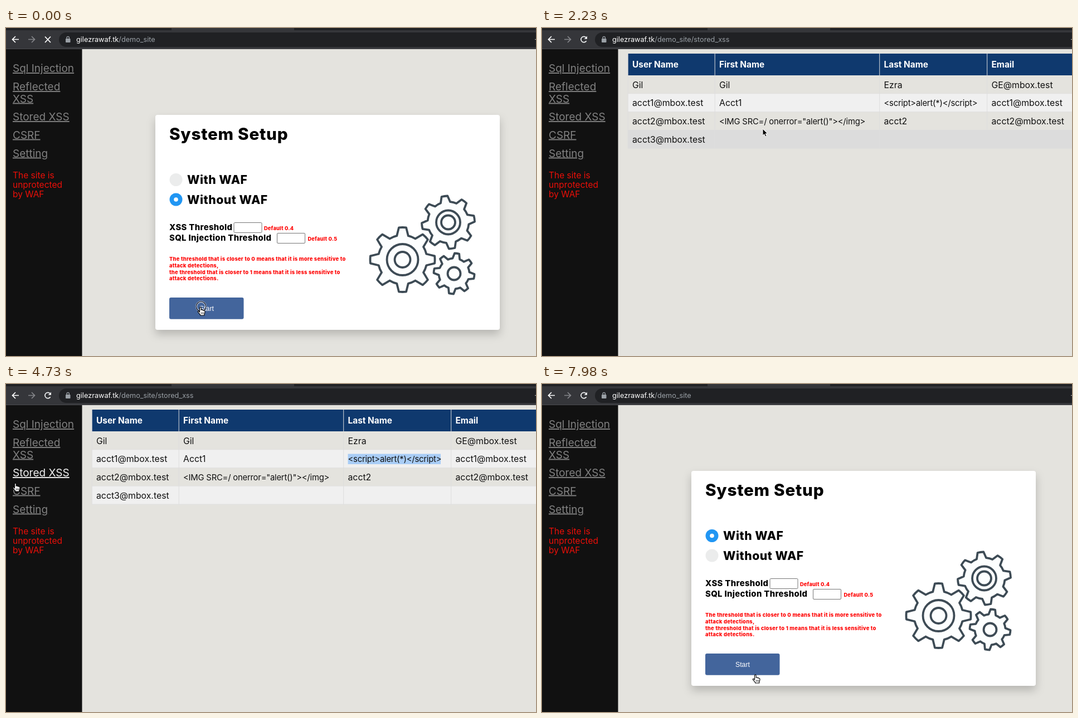
These frames come from a looping animation (951 px wide and 589 px high, 8000 ms). An HTML page:

```html
<!DOCTYPE html>
<html lang="en">
<head>
<meta charset="utf-8">
<title>Demo site</title>
<style>
  html, body { margin: 0; width: 100%; height: 100%; overflow: hidden; background: #e4e3de; }
  svg { display: block; font-family: Inter, "Open Sans", sans-serif; }
  text[font-weight="800"] { letter-spacing: .025em; }
  .link { text-decoration: underline; text-decoration-thickness: 1px; text-underline-offset: 2px; }
  .button { font-family: "Liberation Sans", Arial, sans-serif; }
  .code { letter-spacing: -0.2px; }
  .card { filter: drop-shadow(0 4px 4px rgba(0,0,0,.2)); }
  .card.over { filter: drop-shadow(0 8px 8px rgba(0,0,0,.2)); }
</style>
</head>
<body>
<svg id="stage" width="951" height="589" viewBox="0 0 951 589"></svg>
<script>
const LOOP = 8000, STEP = 147.6;
const stage = document.getElementById('stage');

// Pointer tip: step, x, y
const path = [
  [0, 348, 501], [4, 348, 501], [7, 180, 300], [8, 50, 185], [9, 19, 157], [10, 17, 154],
  [12, 17, 154], [13, 70, 170], [15, 396, 181], [16, 318, 167], [19, 580, 168], [21, 582, 169],
  [22, 632, 143], [24, 614, 134], [28, 780, 136], [30, 780, 136], [31, 150, 150], [32, 16, 178],
  [33, 17, 186], [34, 17, 186], [36, 50, 221], [37, 50, 221], [38, 50, 219], [43, 50, 219],
  [44, 70, 230], [48, 305, 270], [49, 306, 271], [51, 365, 417], [52, 370, 450], [54, 382, 522]
];

// State changes, kept until the next change
const changes = [
  [0, { page: 'setup', load: true, ring: true, radio: 1, shift: 0, row: -1, link: '', pointer: 'hand' }],
  [1, { load: false, ring: false, radio: -1, shift: 43.5, pointer: 'arrow' }],
  [9, { link: 'Stored XSS', pointer: 'hand' }],
  [10, { load: true }],
  [11, { page: 'table', load: false, shift: 0 }],
  [13, { link: '', pointer: 'arrow' }],
  [14, { row: 3 }],
  [16, { row: 2, pointer: 'beam' }],
  [22, { pointer: 'arrow' }],
  [23, { row: 1 }],
  [24, { pointer: 'beam' }],
  [31, { row: -1, pointer: 'arrow' }],
  [32, { link: 'Stored XSS', pointer: 'hand' }],
  [33, { link: 'CSRF' }],
  [35, { link: 'Setting' }],
  [40, { load: true }],
  [41, { page: 'setup', link: '' }],
  [42, { load: false }],
  [44, { pointer: 'arrow' }],
  [47, { pointer: 'hand' }],
  [49, { radio: 0 }],
  [50, { pointer: 'arrow' }],
  [53, { pointer: 'hand' }]
];

const text = (x, y, size, weight, fill, str, more = '') =>
  `<text x="${x}" y="${y}" font-size="${size}" font-weight="${weight}" fill="${fill}" ${more}>${str}</text>`;
const rect = (x, y, w, h, fill, more = '') =>
  `<rect x="${x}" y="${y}" width="${w}" height="${h}" fill="${fill}" ${more}/>`;
const circle = (x, y, r, fill, more = '') =>
  `<circle cx="${x}" cy="${y}" r="${r}" fill="${fill}" ${more}/>`;
const line = (d, stroke, width, more = '') =>
  `<path d="${d}" fill="none" stroke="${stroke}" stroke-width="${width}" ${more}/>`;

function pointerAt(step) {
  const i = path.findIndex(p => p[0] >= step);
  if (i < 0) return path[path.length - 1].slice(1);
  const [t1, x1, y1] = path[i];
  if (t1 === step) return [x1, y1];
  const [t0, x0, y0] = path[i - 1], k = (step - t0) / (t1 - t0);
  return [x0 + (x1 - x0) * k, y0 + (y1 - y0) * k];
}

function gear(cx, cy, root, tip, turn, rings) {
  let d = '';
  const at = (r, deg) => {
    const a = deg * Math.PI / 180;
    return `${(cx + r * Math.cos(a)).toFixed(2)} ${(cy + r * Math.sin(a)).toFixed(2)}`;
  };
  for (let k = 0; k < 8; k++) {
    const a = turn + k * 45;
    d += `${k ? `A${root} ${root} 0 0 1 ` : 'M'}${at(root, a - 13.5)}L${at(tip, a - 6.5)}` +
         `A${tip} ${tip} 0 0 1 ${at(tip, a + 6.5)}L${at(root, a + 13.5)}`;
  }
  d += `A${root} ${root} 0 0 1 ${at(root, turn - 13.5)}Z`;
  return `<g stroke="#3d4b55" stroke-width="3.8" stroke-linejoin="round" fill="#fcfefe"><path d="${d}"/>` +
    rings.map(r => circle(cx, cy, r, '#fcfefe')).join('') + '</g>';
}

function browser(s) {
  const url = '/demo_site' + (s.page === 'table' ? '/stored_xss' : '');
  const icon = s.load
    ? line('M70 15.5l10 10.5M80 15.5l-10 10.5', '#fff', 1.8)
    : line('M79.6 23.2A5.2 5.2 0 1 1 79 17', '#f1f3f4', 1.7) + '<path d="M81 14.5v5.3h-5.3z" fill="#f1f3f4"/>';
  return rect(0, 0, 951, 38, '#35363a') + rect(0, 0, 297, 4, '#202124') + rect(517, 0, 434, 4, '#202124') +
    rect(0, 37, 951, 1, '#4a4b4f') + rect(95, 8, 880, 26, '#202124', 'rx="13"') +
    line('M23 20.5h-11M17 15l-5.5 5.5 5.5 5.5', '#fff', 1.7) +
    line('M40 20.5h11M46 15l5.5 5.5-5.5 5.5', '#85868a', 1.7) + icon +
    rect(107, 19, 8.5, 7, '#9aa0a6', 'rx="1"') + line('M109 19v-1.5a2.2 2.2 0 0 1 4.4 0v1.5', '#9aa0a6', 1.3) +
    text(126, 25, 12.7, 400, '#fff', `gilezrawaf.tk<tspan fill="#9aa0a6">${url}</tspan>`) +
    rect(949, 20, 2, 1, '#bbb');
}

function sidebar(s) {
  const links = [['Sql Injection', 79], ['Reflected', 112], ['XSS', 133.5], ['Stored XSS', 166], ['CSRF', 198.5], ['Setting', 231.5]];
  const notes = ['The site is', 'unprotected', 'by WAF'];
  return rect(0, 38, 136.5, 551, '#111') +
    links.map(([t, y]) => text(12, y, 19, 400, t === s.link ? '#f1f1f1' : '#818181', t, 'class="link"')).join('') +
    notes.map((t, i) => text(12, 269.5 + i * 17.2, 15.5, 400, '#ec0f08', t)).join('');
}

function setup(s, x, y) {
  const over = x > 268 && x < 886 && y > 156 + s.shift;
  const radio = (i, label) => {
    const cy = 272.5 + i * 35.5, on = s.radio === i;
    return circle(305, cy, 11.5, on ? '#2196f3' : '#ebecec') + (on ? circle(305, cy, 3.8, '#fff') : '') +
      text(325, cy + 7.5, 21.2, 800, '#000', label);
  };
  const input = (ix, iy) => rect(ix, iy, 50, 18, '#fff', 'stroke="#767676" rx="1.5"');
  const notes = ['The threshold that is closer to 0 means that it is more sensitive to', 'attack detections,',
    'the threshold that is closer to 1 means that it is less sensitive to', 'attack detections.'];
  return (s.shift ? text(577, 62, 17.5, 800, '#f00', 'The site is unprotected now by WAF', 'text-anchor="middle"') : '') +
    `<g transform="translate(0 ${s.shift})">` +
    rect(268, 156, 618, 386, '#fff', `rx="4" class="card ${over ? 'over' : ''}"`) +
    text(293, 200.5, 29.7, 800, '#000', 'System Setup') + radio(0, 'With WAF') + radio(1, 'Without WAF') +
    text(293, 362.5, 14.8, 800, '#000', 'XSS Threshold') + input(409, 349.5) +
    text(463, 362.5, 9.2, 800, '#f00', 'Default 0.4') +
    text(293, 382, 14.8, 800, '#000', 'SQL Injection Threshold') + input(486.5, 368.5) +
    text(541.5, 381.5, 9.2, 800, '#f00', 'Default 0.5') +
    notes.map((t, i) => text(293, 418 + i * 11.8, 9.4, 800, '#f00', t)).join('') +
    rect(293, 484, 133.5, 38.7, '#43659c', 'rx="3"') +
    text(360, 507.5, 12.3, 400, '#fff', 'Start', 'class="button" text-anchor="middle"') +
    gear(793.5, 349, 37, 47.5, -8, [21.5, 12.5]) +
    gear(711.5, 416, 44, 58, 0, [28, 14]) +
    gear(804, 441, 27.5, 36.5, 8, [11.5]) + '</g>';
}

function table(s, step, x) {
  const cols = [154, 310, 605.5, 798.5];
  const head = ['User Name', 'First Name', 'Last Name', 'Email'];
  const img = '&lt;IMG SRC=/ onerror="alert()"&gt;&lt;/img&gt;';
  const script = '&lt;script&gt;alert(*)&lt;/script&gt;';
  const rows = [
    ['Gil', 'Gil', 'Ezra', 'GE@mbox.test'],
    ['acct1@mbox.test', 'Acct1', script, 'acct1@mbox.test'],
    ['acct2@mbox.test', img, 'acct2', 'acct2@mbox.test'],
    ['acct3@mbox.test', '', '', '']
  ];
  const select = (from, to, y, end) =>
    rect(from, y, Math.max(0, Math.min(end, to) - from), 18.5, '#a9cdf6');
  let out = rect(154, 46, 797, 39, '#0f396e');
  rows.forEach((r, i) => {
    const y = 85.5 + i * 32.7;
    const fill = s.row === i ? '#dcdcdc' : i % 2 ? '#f0f0f0' : '#e4e3de';
    out += rect(154, y, 797, 32.7, fill) + line(`M154 ${y + 32.5}H951`, '#ddd', 1);
  });
  if (step >= 16 && step < 24) out += select(318, step < 19 ? x : 580, 158, 580);
  if (step >= 24) out += select(613.5, step < 28 ? x : 780, 125.5, 780);
  cols.forEach((cx, c) => {
    out += line(`M${cx + .2} 46V216`, '#ddd', 1) + text(cx + 8, 71, 15.4, 700, '#fff', head[c]);
    rows.forEach((r, i) => {
      const code = r[c].startsWith('&lt;');
      out += text(cx + 8, 107.5 + i * 32.7, code ? 14.8 : 15.8, 400, '#111', r[c], code ? 'class="code"' : '');
    });
  });
  return out;
}

const pointers = {
  arrow: '<path d="M0 0v12.2l2.8-2.6 2 4.5 2.2-1-2-4.3h3.8z" fill="#000" stroke="#fff" stroke-width="1"/>',
  hand: '<path d="M0 0.5C1-.3 2 .2 2.1 1.3V5.2C3 4.4 4.4 4.8 4.6 5.8 5.6 5.2 6.7 5.6 6.9 6.6 8 6.2 9 6.8 9 8c0 3-.8 4-1.2 5.2V15H.6v-1.2C-.8 12.4-2 10.8-3.6 8.8-4.2 7.6-2.6 6.9-1.7 7.9L-.5 9V1.4Q-.5.8 0 .5z" ' +
    'fill="#fff" stroke="#000" stroke-width="1.1"/><path d="M2.4 9.5v3M4.5 9.5v3M6.6 9.5v3" stroke="#000" stroke-width=".8"/>',
  beam: '<path d="M-2.5-7.5Q0-7.5 0-5V5Q0 7.5-2.5 7.5M2.5-7.5Q0-7.5 0-5M0 5Q0 7.5 2.5 7.5" fill="none" stroke="#000"/>'
};

function draw(step) {
  const s = Object.assign({}, ...changes.filter(c => c[0] <= step).map(c => c[1]));
  const [x, y] = pointerAt(step);
  const ring = s.ring
    ? circle(350, 500, 8.5, 'none', 'stroke="#fff" stroke-width="2.8"') + circle(350, 500, 8.7, 'none', 'stroke="#17233c" stroke-width="1.6"')
    : '';
  stage.innerHTML = rect(0, 0, 951, 589, '#e4e3de') +
    (s.page === 'setup' ? setup(s, x, y) : table(s, step, x)) + sidebar(s) + browser(s) + ring +
    `<g transform="translate(${x} ${y})">${pointers[s.pointer]}</g>`;
}

let shown = -1;
function tick() {
  const step = Math.floor(performance.now() % LOOP / STEP);
  if (step !== shown) draw(shown = step);
  requestAnimationFrame(tick);
}
tick();
</script>
</body>
</html>
```
